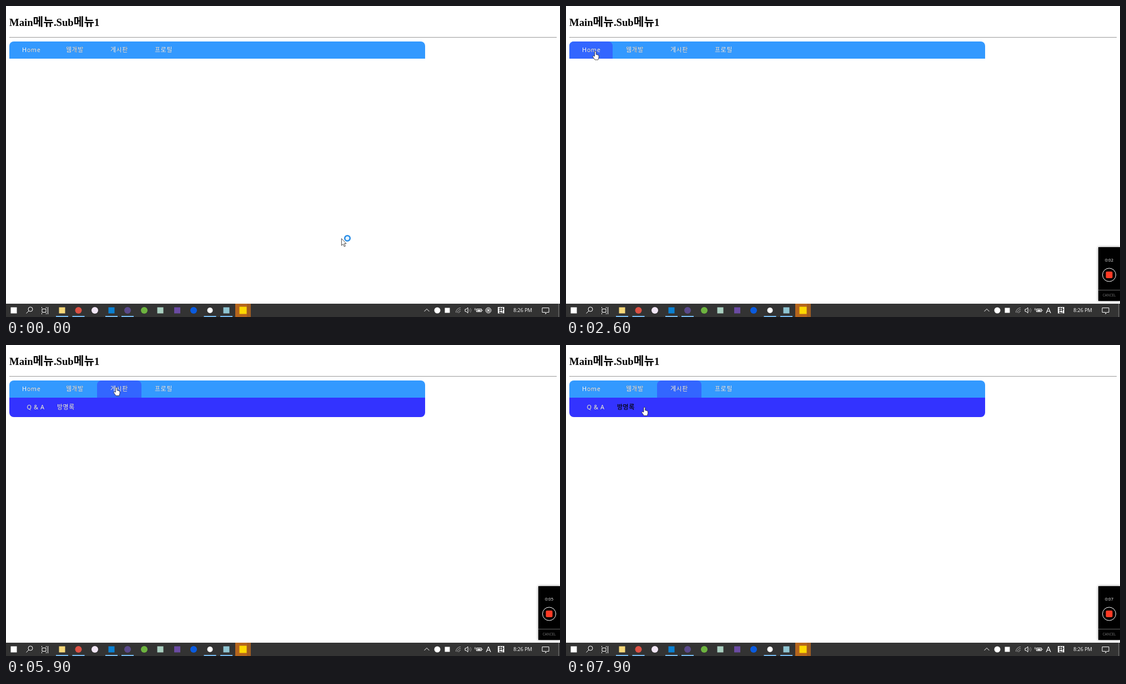
An HTML page that plays this animation: 998 by 561 pixels, repeating every 8000 ms.

```html
<!DOCTYPE html>
<html lang="ko">
<head>
<meta charset="utf-8">
<style>
  html, body { margin: 0; width: 100%; height: 100%; overflow: hidden; background: #fff; }
  svg { display: block; width: 998px; height: 561px; }
  text { font-family: 'Noto Sans', 'Noto Sans CJK KR', sans-serif; }
  .title { font: bold 18.7px 'Liberation Serif', 'Noto Sans CJK KR', serif; }
  .ko { font-size: 20.3px; }
  .menu text { font-size: 10.9px; letter-spacing: .6px; fill: #fff; filter: drop-shadow(.8px .8px .4px #000c); }
  .menu text.hot { fill: #000; }
  .ui { font-family: 'Open Sans', sans-serif; fill: #fff; }
  .line { fill: none; stroke: #fff; }
</style>
</head>
<body>
<svg viewBox="0 0 998 561">
  <text class="title" x="6" y="36">Main<tspan class="ko">메뉴</tspan>.Sub<tspan class="ko">메뉴</tspan>1</text>
  <path d="M6 56.5H992" stroke="#9a9a9a"/>
  <g class="menu">
    <path d="M6 95V72a8 8 0 0 1 8-8H747a8 8 0 0 1 8 8V95z" fill="#39f"/>
    <path id="tab" fill="#36f"/>
    <path id="drop" d="M6 95H755V122a8 8 0 0 1-8 8H14a8 8 0 0 1-8-8z" fill="#33f"/>
    <g id="labels"></g>
  </g>

  <g id="taskbar">
    <path d="M0 537H998V561H0z" fill="#333"/>
    <path d="M413 537h28v24h-28z" fill="#b5651d"/>
    <path d="M434 537h7v24h-7z" fill="#a05c22"/>
    <g id="icons"></g>
    <g class="line">
      <circle cx="44" cy="547" r="4"/>
      <path d="M41 550L36.500 554.500"/>
      <path d="M65 546.500h7v6h-7zM64.500 543v2M72.500 543v2M64.500 554v2M72.500 554v2M75.500 543v13"/>
      <path d="M753.500 551l4.500-4.500 4.500 4.500"/>
      <path d="M810.500 553a8.500 8.500 0 0 1 8.500-8.500M813 553.500a6 6 0 0 1 6-6M815.500 554a3.500 3.500 0 0 1 3.500-3.500" stroke="#aaa"/>
      <path d="M827 547h2l3-3v10l-3-3h-2z"/>
      <path d="M834 546.500q2 2.500 0 5M836.500 545q3 4 0 8" stroke="#888"/>
      <path d="M847.500 546.500h9v5h-9zM845 545v4M858 548v2"/>
      <path d="M966 544.500h12v8h-4l-2 3v-3h-6z"/>
      <path d="M995.500 537v24" stroke="#777"/>
    </g>
    <path d="M849 548h6v2.500h-6zM886 543h11.500v11.500H886z" fill="#fff"/>
    <text x="891.800" y="552.500" font-size="10" font-weight="bold" text-anchor="middle">한</text>
    <text class="ui" x="914" y="552.300" font-size="9">8:26 PM</text>
    <g id="offline">
      <circle cx="869" cy="549" r="5" fill="#777" stroke="#ccc"/>
      <path class="line" d="M867 547l4 4M871 547l-4 4"/>
    </g>
    <text id="input" class="ui" x="869" y="554" font-size="14.500" text-anchor="middle">A</text>
  </g>

  <g id="recorder" text-anchor="middle">
    <path d="M959 435h39v97h-39z" style="filter:drop-shadow(0 0 2px #0008)"/>
    <text id="timer" class="ui" x="978.500" y="460.500" font-size="7.500"></text>
    <circle class="line" cx="978.500" cy="485" r="12"/>
    <rect x="972.500" y="479" width="12" height="12" rx="2" fill="#ff3b25"/>
    <path d="M959 512.500h39" stroke="#666"/>
    <text class="ui" x="978.500" y="523.500" font-size="6.300" style="fill:#777">CANCEL</text>
  </g>

  <g id="cursor" stroke="#222" stroke-width=".8" stroke-linejoin="round">
    <path id="arrow" d="M.4.5V13L3.300 10.400 5.300 15 7.300 14.100 5.400 9.600H9z" fill="#fff"/>
    <path id="hand" d="M-1.500 8V.5a1.300 1.300 0 0 1 2.600 0V4.800L3.800 5.400 6 6.600V10.500L4.800 14.500H-1L-4.600 9.400a1.200 1.200 0 0 1 1.700-1.700z" fill="#fff"/>
    <circle id="busy" cx="11" cy="0" r="4.800" fill="#e4f3ff" stroke="#2b8ee6" stroke-width="2.600"/>
  </g>
</svg>
<script>
const $ = id => document.getElementById(id);
const show = (id, on) => $(id).style.display = on ? '' : 'none';
const label = (x, y, s, id = '') => `<text id="${id}" x="${x}" y="${y}">${s}</text>`;

const edges = [6, 84, 164, 244, 324];
$('labels').innerHTML =
  ['Home', '웹개발', '게시판', '프로필'].map((s, i) => label([29, 108, 188, 268][i], 83, s)).join('') +
  `<g id="web">${label(37.5, 116, '웹디자인') + label(105, 116, 'HTML5 + CSS3') + label(208.5, 116, 'JQuery') + label(268, 116, '웹+ 모바일')}</g>` +
  `<g id="board">${label(37.5, 116, 'Q &amp; A', 'qna') + label(92, 116, '방명록', 'guest')}</g>`;

// Plain app marks: centre x, colour, size, round, running
$('icons').innerHTML = [
  [14, '#fff', 11], [101, '#f5d778', 11, 0, 1], [130.5, '#dd5144', 12, 1, 1], [160, '#f1e6f5', 12, 1],
  [190, '#0a80d2', 11, 0, 1], [219, '#5a4a8c', 12, 1, 1], [249, '#6db33f', 12, 1], [278, '#a9cfc0', 11],
  [308.5, '#6b4ba3', 11], [338, '#0a5be0', 12, 1], [367.5, '#fff', 10, 1, 1], [397, '#8fc4d2', 11, 0, 1],
  [427, '#ffd800', 13], [777, '#fff', 11, 1], [795, '#fff', 9]
].map(([x, color, d, round, running]) =>
  `<rect x="${x - d / 2}" y="${549 - d / 2}" width="${d}" height="${d}" rx="${round ? d / 2 : 0}" fill="${color}"/>` +
  (running ? `<path d="M${x - 11} 559h22v2h-22z" fill="#76b9ed"/>` : '')).join('');

// Pointer stops: time, x, y
const stops = [
  [0, 604, 419], [100, 604, 419], [1300, 77, 140], [1900, 77, 140], [2700, 52, 80], [3000, 52, 80],
  [3700, 82.5, 77], [3800, 82.5, 77], [4400, 115.5, 77], [4600, 115.5, 77], [5700, 199, 77], [5900, 199, 77],
  [6600, 278, 77], [6800, 278, 77], [7300, 215, 82], [7600, 180, 108], [7900, 141.5, 113], [8000, 141.5, 113]
];
const ease = k => k * k * (3 - 2 * k);

function pointer(t) {
  const i = stops.findIndex(s => s[0] > t);
  const [t0, x0, y0] = stops[i - 1], [t1, x1, y1] = stops[i];
  const k = ease((t - t0) / (t1 - t0));
  return [x0 + (x1 - x0) * k, y0 + (y1 - y0) * k];
}

function draw(t) {
  const [x, y] = pointer(t);
  const inBar = y >= 64 && y < 95 && x >= 6 && x < 324;
  const inDrop = t > 7000 && y >= 95;
  const tab = inBar ? edges.findIndex(e => e > x) - 1 : inDrop ? 2 : -1;
  const onGuest = inDrop && x > 80 && x < 148;
  const onQna = inDrop && x > 26 && x <= 80;

  show('tab', tab >= 0);
  if (tab >= 0)
    $('tab').setAttribute('d', `M${edges[tab]} 95V72a8 8 0 0 1 8-8H${edges[tab + 1] - 8}a8 8 0 0 1 8 8V95z`);
  show('drop', tab === 1 || tab === 2);
  show('web', tab === 1);
  show('board', tab === 2);
  $('guest').classList.toggle('hot', onGuest);
  $('qna').classList.toggle('hot', onQna);

  const link = inBar || onGuest || onQna;
  $('cursor').setAttribute('transform', `translate(${x} ${y})`);
  show('arrow', !link);
  show('hand', link);
  show('busy', t < 600);
  show('offline', t < 800);
  show('input', t >= 800);

  const slide = 44 * (1 - ease(Math.min(1, Math.max(0, (t - 700) / 400))));
  $('recorder').setAttribute('transform', `translate(${slide} 0)`);
  $('timer').textContent = t < 1600 ? '00:00' : '0:0' + Math.floor((t - 600) / 1000);
}

const start = performance.now();
function tick() {
  const t = (performance.now() - start) % 8000;
  draw(Math.floor(t / 100) * 100);
  requestAnimationFrame(tick);
}
tick();
</script>
</body>
</html>
```
